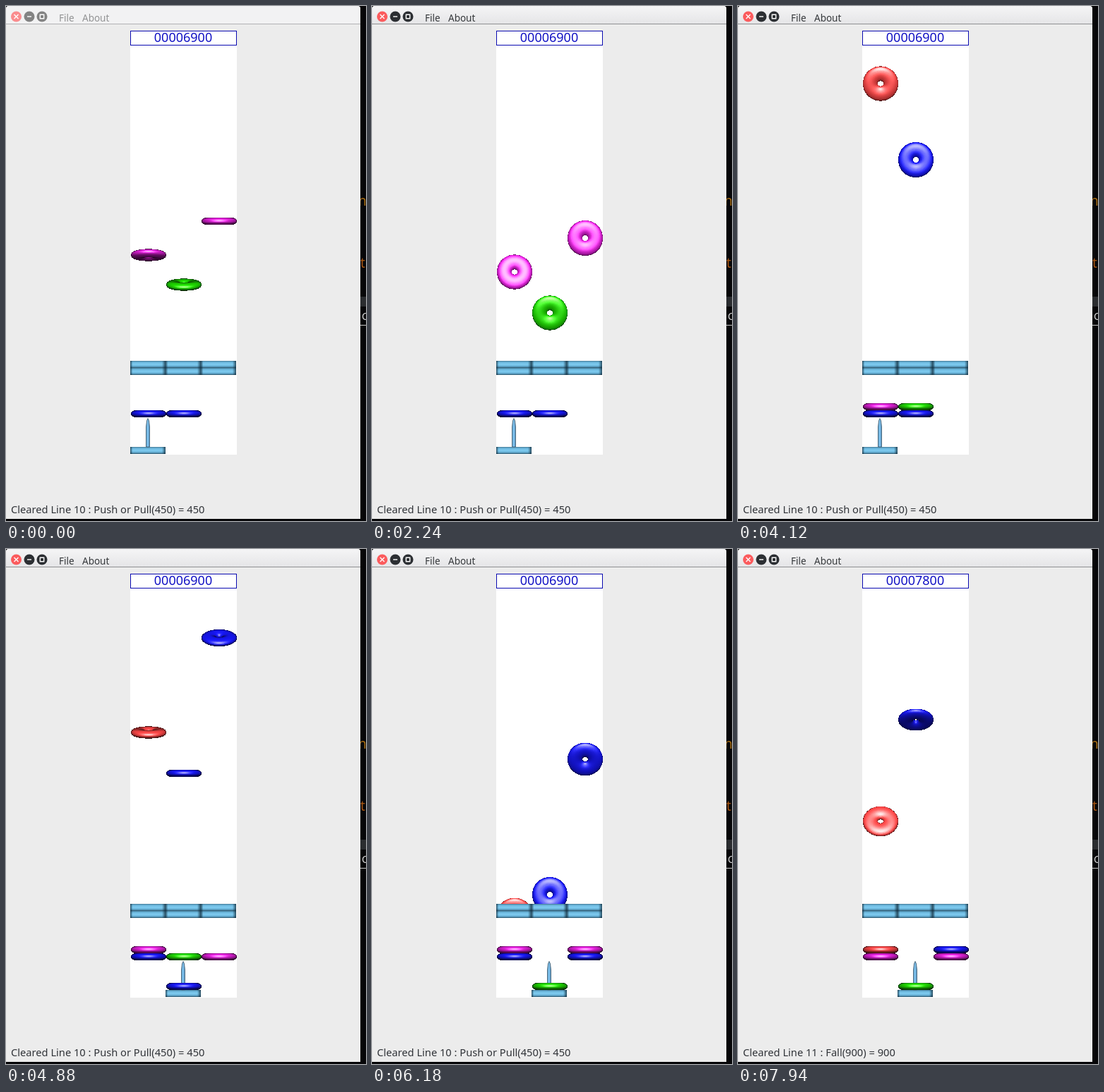
An HTML page with a canvas that plays this animation: 510x730 px, repeating every 8 s.

```html
<!DOCTYPE html>
<html lang="en">
<head>
<meta charset="utf-8">
<title>Falling rings</title>
<style>
  html, body { margin: 0; width: 100%; height: 100%; overflow: hidden; background: #060608; }
  canvas { display: block; width: 510px; height: 730px; }
</style>
</head>
<body>
<canvas id="stage" width="510" height="730"></canvas>
<script>
const ctx = document.getElementById('stage').getContext('2d');
const LOOP = 8000, FPS = 17, STEP = 30.5, SPIN = 0.946;
const FIELD = { x: 176, top: 56, gate: 503, floor: 636, w: 151 };
const DROP_Y = 523, FOCUS_AT = 440, FIRST_STEP = -31, CLEAR_STEP = 119;
const FONT = '"Noto Sans", "Open Sans", sans-serif';

const COLORS = {
  blue: [22, 22, 245],
  magenta: [222, 30, 215],
  green: [30, 215, 0],
  red: [250, 70, 70]
};
const SPEED = { magenta: 3, blue: 4, green: 5, red: 6 };

// y and level are the values at step 0; 16 levels make half a turn
const rings = [
  { color: 'magenta', col: 2, y: 398, level: 13.33 },
  { color: 'magenta', col: 0, y: 446, level: 12.33 },
  { color: 'green', col: 1, y: 550, level: 14.33 },
  { color: 'blue', col: 1, y: 66, level: 4 },
  { color: 'red', col: 0, y: -118, level: 5.35 },
  { color: 'blue', col: 2, y: -126, level: 6 },
  { color: 'red', col: 0, y: -598, level: 9.86 },
  { color: 'blue', col: 1, y: -414, level: 1.86 }
];

const move = col => s => { s.pole = col; };
const pull = s => { s.held = s.cols[s.pole].shift(); };
const push = s => { s.cols[s.pole].unshift(s.held); s.held = null; };
const clearRow = s => s.cols.forEach(c => c.shift());
const land = ring => ({
  at: Math.ceil((DROP_Y - ring.y) / SPEED[ring.color]),
  run: s => s.cols[ring.col].push(ring.color)
});

const events = [
  { at: 51, run: move(1) },
  { at: 59, run: pull },
  { at: 74, run: move(2) },
  { at: 94, run: push },
  { at: 100, run: move(1) },
  { at: 105, run: pull },
  { at: CLEAR_STEP, run: clearRow },
  ...rings.map(land)
].sort((a, b) => a.at - b.at);

function stateAt(step) {
  const s = { cols: [['blue'], ['blue'], []], pole: 0, held: null };
  for (const e of events) if (e.at <= step) e.run(s);
  return s;
}

// Shaded torus with an elliptic section, plotted into a small depth buffer
const SIZE = 52, MID = 26;
function makeSprite(color, level) {
  const c = document.createElement('canvas');
  c.width = c.height = SIZE;
  const g = c.getContext('2d');
  const img = g.createImageData(SIZE, SIZE);
  const depth = new Float32Array(SIZE * SIZE).fill(-99);
  const base = COLORS[color];
  const R = 14.5, A = 10, B = 5;
  const tilt = level * Math.PI / 16, sn = Math.sin(tilt), cs = Math.cos(tilt);
  for (let i = 0; i < 360; i++) {
    const u = i * Math.PI / 180, cu = Math.cos(u), su = Math.sin(u);
    for (let j = 0; j < 150; j++) {
      const v = j * Math.PI / 75, cv = Math.cos(v), sv = Math.sin(v);
      const len = Math.hypot(cv / A, sv / B);
      const nr = cv / A / len, nh = sv / B / len;
      const nz = nh * sn + nr * su * cs;
      if (nz < -0.05) continue;
      const rad = R + A * cv, w = rad * su, h = B * sv;
      const x = Math.floor(MID + rad * cu);
      const y = Math.floor(MID - (h * cs - w * sn));
      const z = h * sn + w * cs;
      const k = y * SIZE + x;
      if (z <= depth[k]) continue;
      depth[k] = z;
      const ny = nh * cs - nr * su * sn;
      const diffuse = Math.max(0, 0.5 * ny + 0.866 * nz);
      const shine = Math.max(0, 0.259 * ny + 0.966 * nz) ** 18;
      const rim = 0.25 + 0.75 * Math.min(1, Math.max(0, nz) * 2.6);
      const light = (0.38 + 0.68 * diffuse) * rim;
      for (let q = 0; q < 3; q++) img.data[k * 4 + q] = base[q] * light + 165 * shine;
      img.data[k * 4 + 3] = 255;
    }
  }
  g.putImageData(img, 0, 0);
  return c;
}

const sprites = {};
function drawRing(color, col, y, level) {
  const key = color + level;
  sprites[key] = sprites[key] || makeSprite(color, level);
  ctx.drawImage(sprites[key], 176 + col * 50, Math.round(y) - MID);
}

function rect(x, y, w, h, fill) {
  ctx.fillStyle = fill;
  ctx.fillRect(x, y, w, h);
}

function gradient(x0, y0, x1, y1, stops) {
  const g = ctx.createLinearGradient(x0, y0, x1, y1);
  stops.forEach(([p, c]) => g.addColorStop(p, c));
  return g;
}

function text(str, x, y, size, fill, align = 'left') {
  ctx.font = `${size}px ${FONT}`;
  ctx.textAlign = align;
  ctx.fillStyle = fill;
  ctx.fillText(str, x, y);
}

function tile(x, y) {
  rect(x, y, 50, 10, gradient(0, y, 0, y + 10,
    [[0, '#3f7591'], [0.18, '#69b4da'], [0.5, '#80cdf2'], [0.75, '#66b0d6'], [1, '#2d566c']]));
  rect(x, y, 50, 10, gradient(x, 0, x + 50, 0,
    [[0, 'rgba(10,35,50,.7)'], [0.07, 'rgba(10,35,50,0)'], [0.9, 'rgba(10,35,50,0)'], [1, 'rgba(10,35,50,.75)']]));
}

function drawPole(col, held) {
  const x = 176 + col * 50, cx = x + 25;
  tile(x, 625);
  ctx.beginPath();
  ctx.moveTo(cx, 584.5);
  ctx.lineTo(cx + 1.5, 588);
  ctx.lineTo(cx + 2.5, 597);
  ctx.lineTo(cx + 2.5, 625);
  ctx.lineTo(cx - 2.5, 625);
  ctx.lineTo(cx - 2.5, 597);
  ctx.lineTo(cx - 1.5, 588);
  ctx.closePath();
  ctx.fillStyle = gradient(cx - 3, 0, cx + 3, 0, [[0, '#5795bb'], [0.45, '#82c6f2'], [1, '#5088b4']]);
  ctx.fill();
  ctx.strokeStyle = '#4d6b80';
  ctx.lineWidth = 1;
  ctx.stroke();
  if (held) drawRing(held, col, 620, 0);
}

function button(x, fill, icon) {
  ctx.beginPath();
  ctx.arc(x, 15, 7.5, 0, 7);
  ctx.fillStyle = fill;
  ctx.fill();
  ctx.strokeStyle = '#fff';
  ctx.lineWidth = 1.4;
  ctx.beginPath();
  icon(x);
  ctx.stroke();
}

const cross = x => {
  ctx.moveTo(x - 3, 12); ctx.lineTo(x + 3, 18);
  ctx.moveTo(x + 3, 12); ctx.lineTo(x - 3, 18);
};
const dash = x => { ctx.moveTo(x - 3, 15); ctx.lineTo(x + 3, 15); };
const box = x => ctx.rect(x - 2.7, 12.3, 5.4, 5.4);

function drawBackdrop() {
  rect(0, 0, 510, 730, '#060608');
  rect(502, 412, 8, 14, '#2b2d30');
  rect(502, 452, 8, 1, '#c8c8c8');
  text('n', 499, 283, 19, '#a86c10');
  text('t', 502, 371, 19, '#a85510');
  text('C', 504, 445, 14, '#d8d8d8');
}

function drawWindow(active) {
  ctx.beginPath();
  ctx.roundRect(0, 0, 502, 727, [4, 4, 0, 0]);
  ctx.fillStyle = '#ececec';
  ctx.fill();
  ctx.beginPath();
  ctx.roundRect(0, 0, 502, 25, [4, 4, 0, 0]);
  ctx.fillStyle = active
    ? gradient(0, 0, 0, 25, [[0, '#f5f5f6'], [1, '#e5e5e7']])
    : '#f2f2f3';
  ctx.fill();
  rect(0, 25, 502, 1, active ? '#8f9092' : '#b2b2b4');
  const dark = active ? '#2c2f33' : '#838383';
  button(14.5, active ? '#fb5b5d' : '#fa8c8e', cross);
  button(33, dark, dash);
  button(51, dark, box);
  const ink = active ? '#35383b' : '#929394';
  text('File', 75, 22, 13.5, ink);
  text('About', 108, 22, 13.5, ink);
}

function drawField(step) {
  const cleared = step >= CLEAR_STEP;
  rect(FIELD.x, FIELD.top, FIELD.w, FIELD.floor - FIELD.top, '#fff');

  ctx.save();
  ctx.beginPath();
  ctx.rect(FIELD.x, FIELD.top, FIELD.w, FIELD.gate - FIELD.top);
  ctx.clip();
  for (const r of rings) {
    const y = r.y + SPEED[r.color] * step;
    if (y < 20 || y >= DROP_Y) continue;
    const level = (Math.round(r.level + SPIN * step) % 16 + 16) % 16;
    drawRing(r.color, r.col, y, level);
  }
  ctx.restore();

  for (let i = 0; i < 6; i++) tile(176 + i % 3 * 50, i < 3 ? 503 : 513);

  const s = stateAt(step);
  s.cols.forEach((stack, col) =>
    stack.forEach((color, i) => drawRing(color, col, 578 - 10 * i, 0)));
  drawPole(s.pole, s.held);

  rect(176, 35, 151, 21, '#0a0ab0');
  rect(177, 36, 149, 19, '#fff');
  text(cleared ? '00007800' : '00006900', 251, 51, 18, '#1010c4', 'center');
  text(cleared ? 'Cleared Line 11 : Fall(900) = 900'
    : 'Cleared Line 10 : Push or Pull(450) = 450', 7, 719, 14.67, '#303338');
}

function draw(t) {
  const shown = Math.floor((t + 5) * FPS / 1000) * 1000 / FPS;
  const step = Math.max(FIRST_STEP, Math.floor((shown - 2941.18) / STEP + 0.17));
  drawBackdrop();
  drawWindow(t >= FOCUS_AT);
  drawField(step);
}

const start = performance.now();
function tick() {
  draw((performance.now() - start) % LOOP);
  requestAnimationFrame(tick);
}
tick();
</script>
</body>
</html>
```
